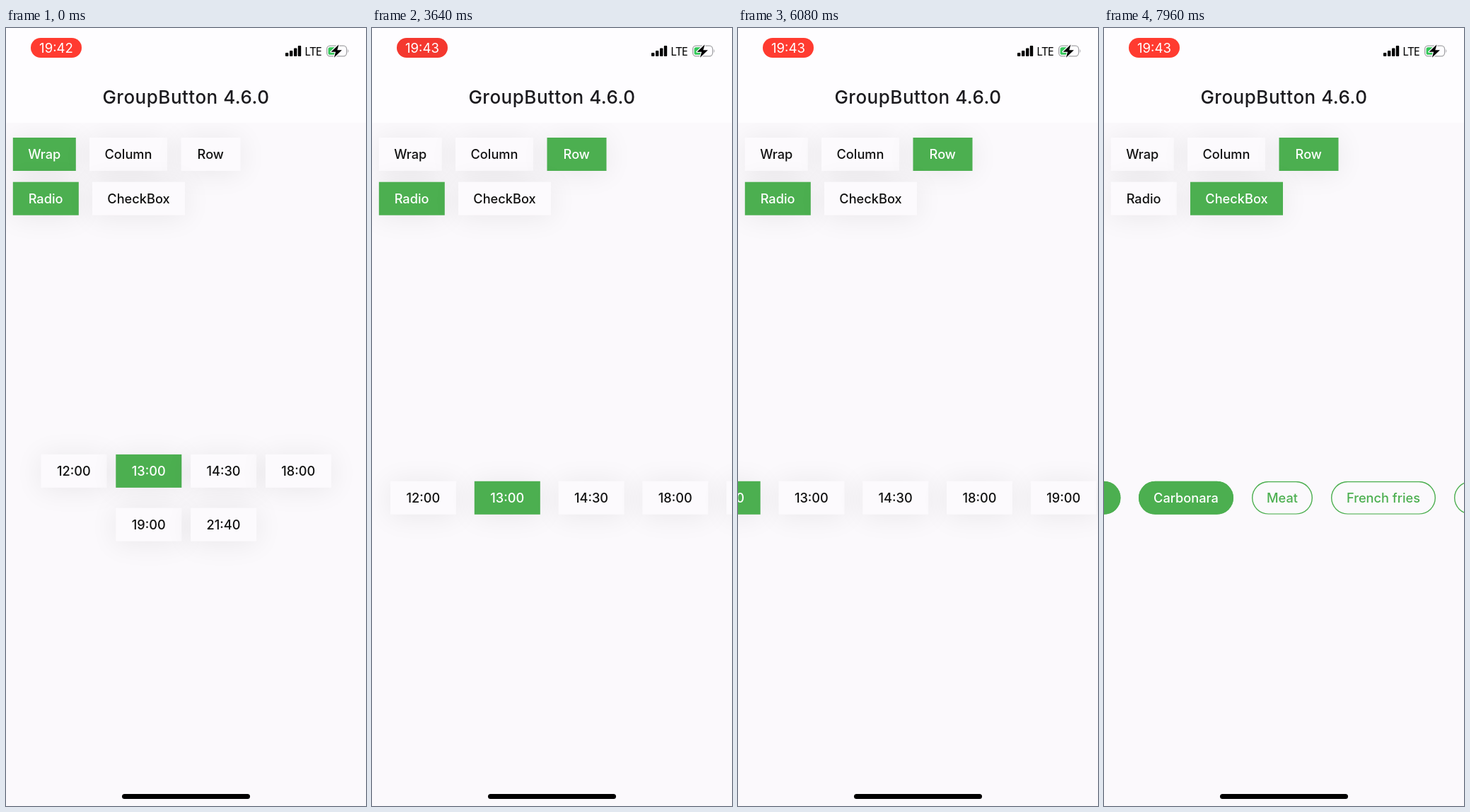
Write an HTML page that moves like this. It is 509 px wide and 1100 px high and loops after 8000 ms.

```html
<!DOCTYPE html>
<html lang="en">
<head>
<meta charset="utf-8">
<title>GroupButton</title>
<style>
  html, body { margin: 0; width: 100%; height: 100%; overflow: hidden; background: #fbf9fc; }
  #stage { position: relative; width: 509px; height: 1100px; overflow: hidden; background: #fbf9fc;
    font: 500 18.2px Inter, sans-serif; color: #111; }
  #stage > * { position: absolute; left: 0; top: 0; box-sizing: border-box; white-space: nowrap; }
  .btn { height: 47px; line-height: 47px; text-align: center;
    box-shadow: 0 2.6px 39px 1.3px rgba(18, 18, 18, .07); }
  .chip { border-radius: 23.5px; box-shadow: inset 0 0 0 1.4px #4caf50; }
  #header { width: 509px; height: 134px; background: #fefdff; }
  #stage > #title { top: 78px; width: 509px; line-height: 40px; font-size: 26px; letter-spacing: .5px;
    text-align: center; color: #1c1b1f; }
  #stage > #pill { left: 35px; top: 14px; width: 72px; height: 27.6px; border-radius: 14px; color: #fff;
    font-weight: 400; font-size: 18.6px; line-height: 28px; text-align: center; }
  #pill svg { position: absolute; left: 26px; top: 4px; }
  #stage > #home { left: 163.8px; top: 1083.1px; width: 181.5px; height: 6.5px; border-radius: 4px; background: #000; }
</style>
</head>
<body>
<div id="stage">
  <div id="header"></div>
  <div id="title">GroupButton 4.6.0</div>
  <div id="pill"><span></span>
    <svg width="20" height="20"><circle cx="10" cy="10" r="8.4" fill="none" stroke="#fff" stroke-width="1.8"/><circle cx="10" cy="10" r="4.2" fill="#fff"/></svg>
  </div>
  <svg id="status" width="509" height="60">
    <rect x="395" y="35" width="4.4" height="5" rx="1"/>
    <rect x="401" y="32" width="4.4" height="8" rx="1"/>
    <rect x="407" y="28.5" width="4.4" height="11.5" rx="1"/>
    <rect x="412.8" y="25" width="4.4" height="15" rx="1"/>
    <text x="422.2" y="38.5" font-family="Noto Sans, sans-serif" font-size="16" font-weight="400" letter-spacing="-.7">LTE</text>
    <rect x="453.6" y="25.2" width="28" height="14.6" rx="4.6" fill="none" stroke="#a3a3a6" stroke-width="1.3"/>
    <path d="M483.4 30q2 2.5 0 5z" fill="#a3a3a6"/>
    <rect x="455.6" y="27.2" width="13" height="10.6" rx="2.6" fill="#34c759"/>
    <path d="M470.5 23.5l-11 10.2h6.6l-2.2 8 11-10.4h-6.6z" stroke="#fefdff" stroke-width="2.4" paint-order="stroke" stroke-linejoin="round"/>
  </svg>
  <div id="home"></div>
</div>
<script>
const LOOP = 8000, FADE = 160;
const GREEN = [76, 175, 80], PLAIN = [252, 250, 253], BODY = [251, 249, 252];
const WHITE = [255, 255, 255], INK = [17, 17, 17];
const stage = document.getElementById('stage'), header = document.getElementById('header');
const pill = document.getElementById('pill');
const clock = pill.querySelector('span'), record = pill.querySelector('svg');

const clamp = v => Math.max(0, Math.min(1, v));
const ramp = (t, a, b) => clamp((t - a) / (b - a));
const mix = (a, b, k) => a.map((v, i) => v + (b[i] - v) * k);
const rgb = c => `rgb(${c.map(Math.round)})`;
const smooth = k => k * k * (3 - 2 * k);
const easeOut = k => 1 - (1 - k) ** 3;

function button(text, width, x = 0, y = 0, chip = false) {
  const el = document.createElement('div');
  el.className = chip ? 'btn chip' : 'btn';
  el.textContent = text;
  el.style.width = width + 'px';
  stage.insertBefore(el, header);
  const b = { el, chip };
  move(b, x, y);
  return b;
}
function move(b, x, y) {
  b.el.style.transform = `translate(${x}px,${y}px)`;
}

// taps: [time, index]; the first entry is the state at the start
const layout = {
  items: [button('Wrap', 89, 9.8, 155), button('Column', 110, 118, 155), button('Row', 83.5, 247.5, 155)],
  taps: [[-999, 0], [1320, 1], [2360, 2]]
};
const kind = {
  items: [button('Radio', 92.6, 9.8, 217.7), button('CheckBox', 131, 122, 217.7)],
  taps: [[-999, 0], [6280, 1]]
};
const times = {
  items: ['12:00', '13:00', '14:30', '18:00', '19:00', '21:40'].map(s => button(s, 92.8)),
  taps: [[-999, 1], [2800, 2], [3220, 1], [3840, 0], [4280, 2], [4740, 1], [5180, 0]]
};
const food = {
  items: [], xs: [],
  on: [0, 1, 2, 3],
  taps: [[6600, 1], [6980, 0]]
};
[['Burger', 102], ['Sandwiches', 149], ['Salad', 91.5], ['Carbonara', 134], ['Meat', 86],
 ['French fries', 148], ['Carbonated soda', 184]].reduce((x, [name, w]) => {
  food.items.push(button(name, w, x, 640.8, true));
  food.xs.push(x);
  return x + w + 26;
}, 26);

const places = [
  i => i < 4 ? [49.5 + 105.8 * i, 602.9] : [155.3 + 105.8 * (i - 4), 678.7],
  i => [208.1, 419 + 88.65 * i],
  i => [26 + 118.8 * i, 640.8]
];
const pulse = [[0, 0], [1100, 1], [2280, 0], [3200, .8], [3640, .3], [4440, 0], [5200, .8],
  [5600, .5], [6100, 0], [6920, 1], [7960, 0], [8000, 0]];

const current = (taps, t) => taps.filter(p => p[0] <= t).pop()[1];

function radioLevel(taps, i, t) {
  const past = taps.filter(p => p[0] <= t);
  const [time, now] = past.pop();
  const before = past.length ? past.pop()[1] : now;
  const k = ramp(t, time, time + FADE);
  return (i === now ? k : 0) + (i === before ? 1 - k : 0);
}
function checkLevel(i, t) {
  let level = food.on.includes(i) ? 1 : 0;
  for (const [time, n] of food.taps) {
    if (n === i && t >= time) level += (1 - 2 * level) * ramp(t, time, time + FADE);
  }
  return level;
}
const flash = (taps, i, t) => Math.max(0, ...taps.map(([time, n]) =>
  n === i ? ramp(t, time - 150, time - 70) * (1 - ramp(t, time + FADE, time + 400)) : 0));

function paint(b, level, glow) {
  const base = mix(b.chip ? BODY : PLAIN, GREEN, level);
  b.el.style.background = rgb(mix(base, WHITE, .24 * glow));
  b.el.style.color = rgb(mix(b.chip ? GREEN : INK, WHITE, level));
}
function paintRadio(group, t) {
  group.items.forEach((b, i) => paint(b, radioLevel(group.taps, i, t), flash(group.taps, i, t)));
}
function show(group, on) {
  for (const b of group.items) b.el.style.visibility = on ? 'visible' : 'hidden';
}
function scrollAt(t) {
  const nudge = easeOut(ramp(t, 5640, 5900)) - smooth(ramp(t, 5940, 6200));
  return 200 * nudge + 397.5 * easeOut(ramp(t, 7240, 7940));
}
function pulseAt(t) {
  const n = pulse.findIndex(p => p[0] > t);
  const [t0, a] = pulse[n - 1], [t1, b] = pulse[n];
  return a + (b - a) * smooth(ramp(t, t0, t1));
}

function render(t) {
  [layout, kind, times].forEach(g => paintRadio(g, t));
  food.items.forEach((b, i) => paint(b, checkLevel(i, t), flash(food.taps, i, t)));

  const mode = current(layout.taps, t), checks = current(kind.taps, t) === 1;
  const scroll = scrollAt(t);
  show(times, !checks);
  show(food, checks);
  times.items.forEach((b, i) => {
    const [x, y] = places[mode](i);
    move(b, x - (mode === 2 ? scroll : 0), y);
  });
  food.items.forEach((b, i) => move(b, food.xs[i] - scroll, 640.8));

  // pressed buttons lift slightly
  for (const g of [layout, kind]) g.items.forEach((b, i) => {
    const lift = flash(g.taps, i, t);
    b.el.style.boxShadow = `0 2.6px 39px 1.3px rgba(18,18,18,.07), 0 1px 1.5px rgba(0,0,0,${.22 * lift})`;
  });

  const icon = ramp(t, 1300, 1500) * (1 - ramp(t, 2850, 3050));
  clock.textContent = t < 2200 ? '19:42' : '19:43';
  clock.style.opacity = 1 - icon;
  record.style.opacity = icon;
  pill.style.background = rgb(mix([255, 59, 48], [219, 50, 45], pulseAt(t)));
}

function tick() {
  render(performance.now() % LOOP);
  requestAnimationFrame(tick);
}
tick();
</script>
</body>
</html>
```
